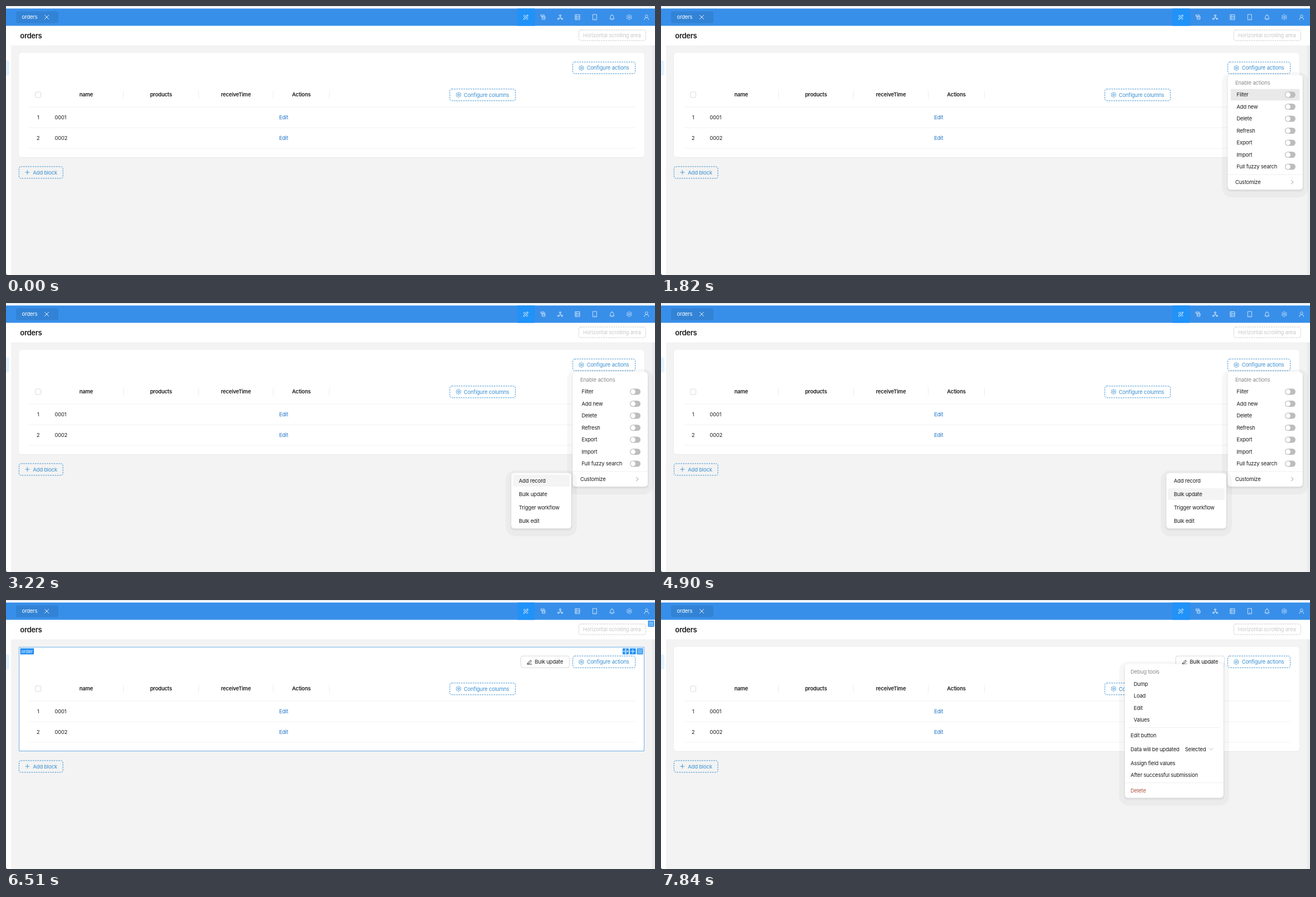
Recreate the animation shown at these times as an HTML page. Size 1163 by 482 pixels, loop 8 s.

```html
<!DOCTYPE html>
<html lang="en">
<head>
<meta charset="utf-8">
<title>orders</title>
<style>
  html, body { margin: 0; width: 100%; height: 100%; overflow: hidden; background: #f3f3f3; }
  svg { display: block; width: 100vw; height: 100vh; }
  text { font: 9.44px Inter, "Open Sans", sans-serif; letter-spacing: -.18px; fill: #1c1c1c; white-space: pre; }
  .bold { font-weight: 600; }
  .title { font-size: 13px; font-weight: 600; letter-spacing: -.3px; }
  .tag { font-size: 8.1px; letter-spacing: 0; }
  .white { fill: #fff; }
  .blue { fill: #3a8fd0; }
  .link { fill: #1f73c9; }
  .muted { fill: #8a8a8a; }
  .pale { fill: #c9c9c9; }
  .red { fill: #b0503f; }
  .line { fill: none; stroke-width: .9; stroke-linecap: round; stroke-linejoin: round; }
</style>
</head>
<body>
<svg id="stage" viewBox="0 0 1163 482" xmlns="http://www.w3.org/2000/svg"></svg>
<script>
const LOOP = 8000, TICK = 70;
const BLUE = '#3a8fd0', ACCENT = '#2490f2';

// Drawing helpers; text is placed by its vertical centre.
const rect = (x, y, w, h, fill, rx = 0, extra = '') =>
  `<rect x="${x}" y="${y}" width="${w}" height="${h}" fill="${fill}" rx="${rx}" ${extra}/>`;
const text = (x, y, label, cls = '', anchor = 'start') =>
  `<text x="${x}" y="${y + 3.4}" class="${cls}" text-anchor="${anchor}">${label}</text>`;
const line = (d, stroke, extra = '') => `<path class="line" d="${d}" stroke="${stroke}" ${extra}/>`;
const at = (x, y, body) => `<g transform="translate(${x} ${y})">${body}</g>`;
const group = (id, body, shown = true) => `<g id="${id}" opacity="${shown ? 1 : 0}">${body}</g>`;

function gear(x, y, color) {
  const points = Array.from({ length: 48 }, (_, i) => {
    const a = i * Math.PI / 24, r = 4.1 + .5 * Math.cos(6 * a);
    return `${(r * Math.sin(a)).toFixed(2)} ${(r * Math.cos(a)).toFixed(2)}`;
  });
  return at(x, y, line(`M${points.join('L')}Z`, color) +
    `<circle class="line" r="1.6" stroke="${color}"/>`);
}
const plus = (x, y, r, color) => line(`M${x - r} ${y}h${2 * r}M${x} ${y - r}v${2 * r}`, color);
const pencil = (color) => at(938, 111,
  line('M-4 4H4M-3 1.8L2 -3.2L3.6 -1.6L-1.4 3.2L-3.2 3.4Z', color));
const dashed = (x, y, w, h, color) =>
  rect(x, y, w, h, 'none', 3.5, `stroke="${color}" stroke-dasharray="2.6 1.6"`);
const button = (x, y, w, label, icon) =>
  dashed(x, y, w, 21, BLUE) + icon + text(x + 25, y + 10.5, label, 'blue');

const glyphs = {
  move: 'M-4 0H4M0 -4V4M-2.9 -1.2L-4 0L-2.9 1.2M2.9 -1.2L4 0L2.9 1.2M-1.2 -2.9L0 -4L1.2 -2.9M-1.2 2.9L0 4L1.2 2.9',
  add: 'M-3.5 0H3.5M0 -3.5V3.5',
  list: 'M-3.7 -2.7H3.7M-3.7 0H3.7M-3.7 2.7H3.7'
};
const handle = (x, y, kind) => at(x, y,
  rect(-5.5, -5.4, 11, 10.8, ACCENT) + line(glyphs[kind], '#fff'));

function popup(id, x, y, w, h, body) {
  const shadow = rect(x - 10, y - 5, w + 20, h + 19, '#000', 17, 'opacity=".03"') +
    rect(x - 2, y + 1, w + 4, h + 3, '#000', 7, 'opacity=".035"') +
    rect(x - .7, y, w + 1.4, h + 1.4, '#000', 6, 'opacity=".05"');
  return group(id, shadow + rect(x, y, w, h, '#fff', 5.5) + body, false);
}
const toggle = y => rect(1118, y - 5.5, 19, 11, '#bdbdbd', 5.5) +
  `<circle cx="1123.6" cy="${y}" r="4.4" fill="#fff"/>`;

function header() {
  const c = 'rgba(255,255,255,.78)';
  const icons = [
    'M-4 -2.5L-2.5 -4L4 2.5L2.5 4ZM-4 4L-3.4 1.6L1.8 -3.6L3.8 -1.6L-1.6 3.4ZM2 -3.8L3.9 -3.9L3.8 -2',
    'M-3.6 -4H2V-1.6H-3.6ZM-2 -1.2V1.2H3.8V-1.2H-1M3.4 1.6V4H-1.5V1.6',
    'M-1.2 -4H1.2V-1.8H-1.2ZM0 -1.8V.8M0 .8L-2.6 2.4M0 .8L2.6 2.4M-4.2 2H-2.2V4H-4.2ZM2.2 2H4.2V4H2.2Z',
    'M-3.8 -4.5H3.8V4.5H-3.8ZM-3.8 -1.5H3.8M-3.8 1.5H3.8M-2 -3H-1.5M-2 0H-1.5M-2 3H-1.5',
    'M-3.3 -4.8H3.3V4.8H-3.3ZM-.4 3H.4',
    'M-4 3H4M-3 3V-.5A3 3 0 0 1 3 -.5V3M0 -3.5V-4.6M-1 4.6H1',
    '',
    'M-3.8 4.5A3.8 3.8 0 0 1 3.8 4.5M0 .6A2.4 2.4 0 1 1 .1 .6'
  ];
  return rect(0, 4.5, 1163, 31, '#388fe9') + rect(18, 9.5, 76, 21.5, '#3283d6', 4) +
    text(28.5, 20, 'orders', 'white') +
    line('M69.5 16.5l7 7m0 -7l-7 7', '#fff') + rect(916.5, 4.5, 31, 31, '#2092f8') +
    icons.map((d, i) => {
      const x = 931.5 + 30.9 * i;
      return d ? at(x, 20, line(d, c)) : gear(x, 20, c);
    }).join('');
}

function table() {
  const columns = [['name', 143.7], ['products', 277.8], ['receiveTime', 412], ['Actions', 529.3]];
  const rows = [['1', '0001', 199.5], ['2', '0002', 236.5]];
  return rect(52.5, 154, 10, 10, '#fff', 2.2, 'stroke="#d9d9d9"') +
    columns.map(([label, x]) => text(x, 159, label, 'bold', 'middle')).join('') +
    [210, 344.5, 478.5, 579].map(x => rect(x, 152, 1, 14, '#ececec')).join('') +
    [180.5, 217.5, 254.5].map(y => rect(41, y, 1087, 1, '#f1f1f1')).join('') +
    rows.map(([n, name, y]) => text(57.5, y, n, '', 'middle') + text(87.2, y, name) +
      text(489.5, y, 'Edit', 'link')).join('');
}

const actions = ['Filter', 'Add new', 'Delete', 'Refresh', 'Export', 'Import', 'Full fuzzy search'];
const custom = ['Add record', 'Bulk update', 'Trigger workflow', 'Bulk edit'];
const actionY = i => 159 + 21.5 * i;
const customY = i => 318.2 + 24.2 * i;

const actionMenu = popup('menu', 1015.5, 124, 134.5, 205,
  rect(1021, 0, 123.5, 20.6, '#e9e9e9', 0, 'id="menuMark"') +
  text(1029, 137.5, 'Enable actions', 'muted') +
  actions.map((label, i) => text(1031.5, actionY(i), label) + toggle(actionY(i))).join('') +
  rect(1015.5, 301.5, 134.5, 1, '#efefef') +
  text(1029, 315.5, 'Customize') + line('M1129.5 312.3l3.6 3.2l-3.6 3.2', '#888'));

const customMenu = popup('submenu', 905.5, 305, 107.5, 99,
  rect(908.2, 0, 102, 21.4, '#f4f4f4', 3, 'id="subMark"') +
  custom.map((label, i) => text(919, customY(i), label)).join(''));

const debugMenu = popup('debug', 831, 115, 177, 239.5,
  text(841.5, 129, 'Debug tools', 'muted') +
  ['Dump', 'Load', 'Edit', 'Values'].map((label, i) => text(847, 150.5 + 21.5 * i, label)).join('') +
  rect(837, 228, 165, 1, '#efefef') +
  text(841.5, 242.5, 'Edit button') + text(841.5, 267.3, 'Data will be updated') +
  text(939, 267.3, 'Selected') + line('M982.8 265.8l2.9 3l2.9 -3', '#aaa') +
  text(841.5, 292.3, 'Assign field values') + text(841.5, 313.7, 'After successful submission') +
  rect(831, 327, 177, 1, '#efefef') + text(841.5, 341.2, 'Delete', 'red'));

document.getElementById('stage').innerHTML =
  rect(0, 0, 1163, 482, '#f3f3f3') + rect(0, 0, 1163, 70.5, '#fff') +
  rect(0, 0, 1163, .8, '#d4d4d4') + rect(0, 35, 9, 447, '#fff') +
  rect(-6, 97.5, 12, 27, '#e4f2fe', 4) + rect(1158, 70.5, 5, 411.5, '#ebebeb') +
  '<path d="M0 479.5Q.3 481.7 2.5 482H0Z" fill="#333"/>' + header() +
  text(25.3, 54.5, 'orders', 'title') +
  dashed(1026.5, 43, 120, 19, '#c6c6c6') + text(1034, 52.5, 'Horizontal scrolling area', 'pale') +
  rect(22.5, 84, 1122, 188, '#e9e9e9', 6) + rect(23, 84, 1121, 187, '#fff', 5.5) + table() +
  button(1015.7, 100.3, 112, 'Configure actions', gear(1031, 111, BLUE)) +
  button(795.3, 148.8, 117.5, 'Configure columns', gear(811, 159, BLUE)) +
  button(23.3, 287.8, 78.7, 'Add block', plus(38.3, 298, 3.6, BLUE)) +
  group('bulk', rect(922.5, 100.3, 87, 21, '#fff', 3.5, 'stroke="#d9d9d9"') +
    pencil('#1c1c1c') + text(947.5, 111, 'Bulk update'), false) +
  group('blockHover', rect(23.5, 84.5, 1120, 186, 'none', 0, 'stroke="#74b4ea"') +
    rect(25.5, 86.5, 24.5, 11, ACCENT) + text(27.5, 91.8, 'order', 'tag white') +
    handle(1110.5, 92, 'move') + handle(1123.2, 92, 'add') + handle(1136, 92, 'list') +
    handle(1156, 42.4, 'list'), false) +
  group('bulkHover', rect(922.5, 100.3, 87.5, 21, '#e9f4fd', 3, 'stroke="#4f9fdf"') +
    pencil(BLUE) + text(947.5, 111, 'Bulk update', 'blue') +
    handle(990.3, 107.5, 'move') + handle(1003, 107.5, 'list'), false) +
  actionMenu + customMenu + debugMenu;

// Popups: [time, opacity, scale], eased linearly between the rows.
const popups = {
  menu: { x: 1015.5, y: 124, keys: [[1400, 0, .8], [1470, .35, .88], [1540, .8, .96], [1610, .96, .99],
    [1680, 1, 1], [5320, 1, 1], [5390, .88, .98], [5460, .4, .885], [5530, 0, .8]] },
  submenu: { x: 905.5, y: 305, keys: [[2730, 0, .8], [2800, .4, .88], [2870, .9, .98],
    [2940, 1, 1], [5390, 1, 1], [5460, .95, .972], [5530, 0, .8]] },
  debug: { x: 831, y: 115, keys: [[7210, 0, .8], [7280, .6, .92], [7350, 1, 1]] }
};

// Hard changes: [time, value]; the last row reached holds.
const steps = {
  blockHover: [[0, 0], [1260, 1], [1820, 0], [5390, 1], [7770, 0]],
  bulk: [[0, 0], [5320, 1]],
  bulkHover: [[0, 0], [6930, .5], [7000, 1], [7770, 0]]
};
const menuRow = [[0, -1], [1820, 0], [1890, 1], [1960, 2], [2030, 4], [2100, 5], [2170, 6],
  [2310, -1], [2660, 7], [3220, -1]];
const subRow = [[0, -1], [3220, 0], [3430, 1], [3710, 2], [4900, 1], [5390, -1]];

const $ = id => document.getElementById(id);
const held = (rows, t) => rows.filter(row => row[0] <= t).pop()[1];

function pose(keys, t) {
  const next = keys.findIndex(key => key[0] > t);
  if (next === 0) return keys[0].slice(1);
  if (next < 0) return keys[keys.length - 1].slice(1);
  const a = keys[next - 1], b = keys[next], p = (t - a[0]) / (b[0] - a[0]);
  return [1, 2].map(i => a[i] + (b[i] - a[i]) * p);
}

function mark(id, row, y, half) {
  $(id).setAttribute('opacity', row < 0 ? 0 : 1);
  $(id).setAttribute('y', y - half);
}

function draw(now) {
  const t = Math.floor((now % LOOP) / TICK) * TICK;
  for (const id in steps) $(id).setAttribute('opacity', held(steps[id], t));
  for (const id in popups) {
    const { x, y, keys } = popups[id], [opacity, scale] = pose(keys, t);
    $(id).setAttribute('opacity', opacity);
    $(id).setAttribute('transform', `translate(${x} ${y}) scale(${scale}) translate(${-x} ${-y})`);
  }
  const row = held(menuRow, t), sub = held(subRow, t);
  mark('menuMark', row, row === 7 ? 315.5 : actionY(row), 10.3);
  mark('subMark', sub, customY(sub), 10.7);
}

const start = performance.now();
function loop() {
  draw(performance.now() - start);
  requestAnimationFrame(loop);
}
loop();
</script>
</body>
</html>
```
